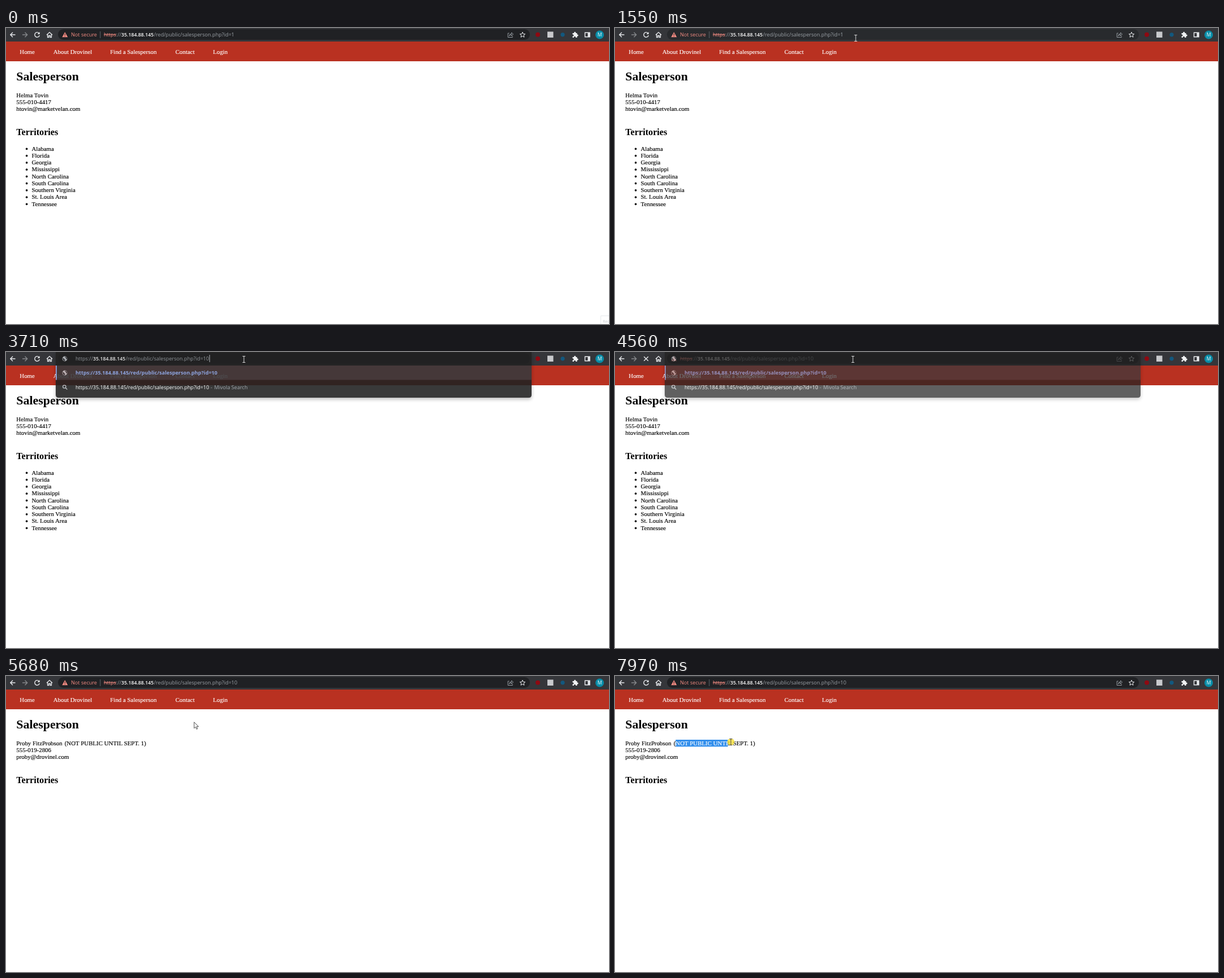
Recreate the animation shown at these times as an HTML page. Size 1067 by 525 pixels, loop 7990 ms.

```html
<!DOCTYPE html>
<html lang="en">
<head>
<meta charset="utf-8">
<title>Salesperson</title>
<style>
  html, body { margin: 0; width: 100%; height: 100%; overflow: hidden; background: #fff; }
  svg { display: block; width: 1067px; height: 525px; }
  text { white-space: pre; }
  .page { font: 10.9px "Liberation Serif", serif; }
  .page text { stroke: #000; stroke-width: .15; }
  .page .light { fill: #fff; stroke: #fff; }
  .page .h1 { font-size: 21.9px; font-weight: bold; stroke: none; }
  .page .h2 { font-size: 16.2px; font-weight: bold; stroke: none; }
  .ui { font: 9.12px "Open Sans", sans-serif; fill: #9aa0a6; }
  .host { font-size: 8.75px; font-weight: 600; fill: #fff; }
  .bad { fill: #f28b82; }
  .struck { text-decoration: line-through; }
  .selected text, .selected .host, .selected .bad { fill: #e8eaed; }
  .line { fill: none; stroke: #e8eaed; stroke-width: 1.4; }
</style>
</head>
<body>
<svg viewBox="0 0 1067 525">
  <defs>
    <clipPath id="labelClip"><rect id="labelWindow" x="114" y="2" width="48" height="20"/></clipPath>
    <clipPath id="markClip"><rect class="mark" x="107.3" y="113" height="12.3"/></clipPath>
    <filter id="shadow" x="-5%" y="-10%" width="110%" height="140%">
      <feDropShadow dx="0" dy="3" stdDeviation="3" flood-opacity=".3"/>
    </filter>
    <g id="globe">
      <circle r="4.4" fill="#bdc1c6"/>
      <path d="M-3.8-1.2Q-1-1.2-.6 1L.8 2.2-.4 4Q-3.6 3-3.8-1.2M.2-4Q.2-2 2-1.6L2.2.4 3.8 1Q4.6-2.8.2-4" fill="#35363a"/>
    </g>
  </defs>

  <g class="page">
    <rect y="24" width="1067" height="35" fill="#b93121"/>
    <g id="nav"></g>
    <text class="h1" x="18.3" y="93">Salesperson</text>
    <text class="h2" x="18.3" y="190.3">Territories</text>
    <g id="firstPage"></g>
    <g id="secondPage">
      <text x="18.3" y="122.7">Proby FitzProbson</text>
      <text id="note" x="103.7" y="122.7">(NOT PUBLIC UNTIL SEPT. 1)</text>
      <text x="18.3" y="135">555-019-2806</text>
      <text x="18.3" y="147.3">proby@drovinel.com</text>
      <rect class="mark" x="107.3" y="113" height="12.3" fill="#338fec"/>
      <text class="light" x="103.7" y="122.7" clip-path="url(#markClip)">(NOT PUBLIC UNTIL SEPT. 1)</text>
    </g>
  </g>

  <g id="notice" class="ui">
    <path d="M1067 510.5h-14.5V525" fill="none" stroke="#e6e9ec"/>
    <text x="1056" y="523" style="font-size:7px;fill:#c4c8cc">Rec</text>
  </g>

  <rect width="1067" height="24" fill="#35363a"/>
  <g class="line">
    <path d="M16.5 12H8M12 7.8L7.8 12 12 16.2"/>
    <path d="M29 12h8.5M33.5 7.8L37.7 12l-4.2 4.2" stroke="#85878a"/>
    <g id="reload"><path d="M58.3 9A4.3 4.3 0 1 0 59.3 13"/><path d="M59.6 7v4h-4z" fill="#e8eaed" stroke="none"/></g>
    <path id="stop" d="M51.2 8.2l7.6 7.6m0-7.6l-7.6 7.6"/>
    <path d="M72 12.2L77 7.6l5 4.6M73.6 11.5V16.5h2.2v-3h2.4v3h2.2V11.5"/>
  </g>

  <rect id="bar" x="92" y="2" width="835" height="19" rx="9.5"/>
  <g id="address" class="ui">
    <path d="M104.3 7.2l5 9h-10z" fill="#f28b82"/>
    <path d="M104.3 10v3m0 .8v1.2" stroke="#202124"/>
    <text class="bad" x="115" y="15.2" clip-path="url(#labelClip)">Not secure</text>
    <path id="divider" d="M166.8 6v12" stroke="#5f6368"/>
    <rect id="urlMark" x="173" y="4" width="232" height="16" fill="#185abc"/>
    <g id="url"></g>
    <path id="urlCaret" d="M405.5 5v13" stroke="#e8eaed"/>
    <g class="line" style="stroke:#9aa0a6;stroke-width:1">
      <path d="M890.5 9.2h-2.3v7.3h8v-2M890.5 14q.3-3.6 4-3.8V8l3 3-3 3v-2q-2.6-.2-4 2z"/>
      <path stroke="#e8eaed" d="M914 7.3l1.3 3.2 3.4.2-2.6 2.2.9 3.4-3-1.9-3 1.9.9-3.4-2.6-2.2 3.4-.2z"/>
    </g>
  </g>
  <rect id="ring" x="92" y="2" width="835" height="19" rx="9.5" fill="none" stroke="#8ab4f8" stroke-width="1.4"/>

  <circle cx="941" cy="11.8" r="4" fill="#8e0912"/>
  <rect x="958" y="6.5" width="10.5" height="10.5" fill="#c9cacd"/>
  <circle cx="985" cy="11.8" r="3.6" fill="#12587f"/>
  <path d="M1002.5 9h2.7a1.6 1.6 0 1 1 3 0h2.3v2.5a1.6 1.6 0 1 1 0 3V17h-2.6a1.5 1.5 0 1 0-2.8 0h-2.6v-2.6a1.5 1.5 0 1 0 0-2.8z" fill="#f1f3f4"/>
  <path d="M1024.5 8.2h8.5v7.6h-8.5z" class="line"/>
  <path d="M1029.5 8h3.5v8h-3.5z" fill="#e8eaed"/>
  <circle cx="1050.5" cy="12" r="7.5" fill="#078da8"/>
  <text class="ui" x="1050.5" y="15" text-anchor="middle" style="font-size:8.5px;fill:#fff">M</text>

  <g id="popup" class="ui">
    <path d="M88 0h842v76q0 5-5 5H93q-5 0-5-5z" fill="#202124" filter="url(#shadow)"/>
    <path d="M88 24h842v25.5H88z" fill="#38393c"/>
    <path d="M88 24h1.8v25.5H88z" fill="#8ab4f8"/>
    <use href="#globe" x="104" y="12"/>
    <use href="#globe" x="104" y="37"/>
    <g class="line" style="stroke:#bdc1c6;stroke-width:1.2"><circle cx="103.3" cy="61.5" r="2.7"/><path d="M105.3 63.5l3 3"/></g>
    <g id="typedUrl"></g>
    <path id="typedCaret" d="M360.3 5v13" stroke="#bdc1c6"/>
    <text x="123" y="40.3" style="font-weight:bold;fill:#8ab4f8">https://35.184.88.145/red/public/salesperson.php?id=10</text>
    <text x="123" y="66.2" style="font-size:9.05px;fill:#fff">https://35.184.88.145/red/public/salesperson.php?id=10</text>
    <text x="362" y="66.2">-</text>
    <text x="368.5" y="66.2">Mivola Search</text>
  </g>

  <g id="cursor">
    <circle id="press" r="6.3" fill="#f7df33" opacity=".8"/>
    <path id="beam" d="M-2.5-5.5h5M0-5.5v11M-2.5 5.5h5" fill="none"/>
    <path id="arrow" d="M0 0v11l2.5-2.4 1.8 4 1.8-.8-1.8-3.8h3.5z" fill="#fff" stroke="#222" stroke-width=".8"/>
  </g>
</svg>
<script>
const LOOP = 7990;
const $ = id => document.getElementById(id);
const show = (id, on) => { $(id).style.display = on ? '' : 'none'; };
const ramp = (t, from, to) => Math.min(1, Math.max(0, (t - from) / (to - from)));
const within = (t, from, to) => t >= from && t < to;
const label = (x, y, words, style = '') => `<text class="${style}" x="${x}" y="${y}">${words}</text>`;

const urlText = (x, id, scheme) => `${scheme}
  <text class="host" x="${x + 31}" y="15.2">35.184.88.145</text>
  <text x="${x + 88.7}" y="15.2">/red/public/salesperson.php?id=<tspan class="pageId">${id}</tspan></text>`;

$('url').innerHTML = urlText(173, 1,
  '<text x="173" y="15.2"><tspan class="bad struck">https</tspan>://</text>');
$('typedUrl').innerHTML = urlText(123, 10, label(123, 15.2, 'https://'));
const pageId = $('url').querySelector('.pageId');

$('nav').innerHTML = [[24.3, 'Home'], [83.7, 'About Drovinel'], [184.3, 'Find a Salesperson'],
  [299.8, 'Contact'], [366.3, 'Login']].map(([x, words]) => label(x, 46, words, 'light')).join('');

const contact = ['Helma Tovin', '555-010-4417', 'htovin@marketvelan.com'];
const territories = ['Alabama', 'Florida', 'Georgia', 'Mississippi', 'North Carolina',
  'South Carolina', 'Southern Virginia', 'St. Louis Area', 'Tennessee'];
$('firstPage').innerHTML =
  contact.map((words, i) => label(18.3, 122.7 + 12.3 * i, words)).join('') +
  territories.map((words, i) => `<circle cx="36.6" cy="${214.4 + 12.25 * i}" r="1.8"/>` +
    label(45.5, 217.7 + 12.25 * i, words)).join('');

// Pointer path: time, x, y
const path = [
  [250, 1046, 514], [500, 942, 414], [800, 620, 180], [1030, 455, 74], [1150, 448, 56],
  [1300, 443, 38], [1420, 435, 27], [1550, 426, 18], [1710, 421, 13],
  [5410, 421, 13], [5600, 375, 50], [5850, 245, 148], [6050, 185, 170], [6190, 163, 161],
  [6350, 128, 122], [6520, 112, 110], [6720, 100, 113], [6990, 111, 120],
  [7410, 111, 120], [7460, 108, 118], [7970, 205, 117]
];

function pointerAt(t) {
  const next = path.findIndex(p => p[0] > t);
  if (next < 0) return path[path.length - 1].slice(1);
  if (next === 0) return path[0].slice(1);
  const a = path[next - 1], b = path[next], k = ramp(t, a[0], b[0]);
  return [a[1] + (b[1] - a[1]) * k, a[2] + (b[2] - a[2]) * k];
}

// Width of the note text selected up to x, snapped to whole letters
function selectedWidth(x) {
  const note = $('note');
  let edge = 107.3;
  for (let i = 1; i < note.getNumberOfChars(); i++) {
    const start = note.getStartPositionOfChar(i).x, end = note.getEndPositionOfChar(i).x;
    if ((start + end) / 2 < x) edge = end;
  }
  return edge - 107.3;
}

function drawAddress(t, hovered) {
  const selected = within(t, 1890, 2840);
  const expand = t < 4540 ? 1 : ramp(t, 4890, 5040);
  const shift = `translate(${-58 * (1 - expand)})`;
  $('bar').setAttribute('fill', hovered && !within(t, 1870, 4640) ? '#282a2d' : '#202124');
  $('ring').style.opacity = t < 3650 ? ramp(t, 1850, 1960) : 0;
  $('url').setAttribute('class', selected ? 'selected' : '');
  $('url').setAttribute('transform', shift);
  $('divider').setAttribute('transform', shift);
  $('divider').style.opacity = expand;
  $('labelWindow').setAttribute('width', 48 * expand);
  pageId.textContent = t < 3650 ? '1' : '10';
  show('urlMark', selected);
  show('urlCaret', within(t, 2840, 3360));
  show('address', !within(t, 3650, 4540));

  const opening = 1 - (1 - ramp(t, 3630, 3750)) ** 2;
  $('popup').style.opacity = opening * (1 - ramp(t, 4530, 4640));
  show('popup', within(t, 3650, 4640));
  show('typedUrl', t < 4540);
  show('typedCaret', t < 4170);
}

function drawPointer(t, x, y, hovered) {
  const pressed = t >= 7410;
  const beam = hovered || t > 6720;
  show('cursor', t >= 250);
  show('press', pressed);
  show('beam', beam);
  show('arrow', !beam);
  $('beam').setAttribute('stroke', hovered ? '#dcdcdc' : '#444');
  $('cursor').setAttribute('transform', `translate(${x} ${y})`);
  const width = pressed ? selectedWidth(x - 3) : 0;
  document.querySelectorAll('.mark').forEach(r => r.setAttribute('width', width));
}

function frame() {
  const t = performance.now() % LOOP;
  const [x, y] = pointerAt(t);
  const hovered = y < 23;
  const loaded = t >= 4930;
  const loading = within(t, 4540, 4930);
  show('notice', t < 30);
  show('firstPage', !loaded);
  show('secondPage', loaded);
  show('stop', loading);
  show('reload', !loading);
  drawAddress(t, hovered);
  drawPointer(t, x, y, hovered);
  requestAnimationFrame(frame);
}
frame();
</script>
</body>
</html>
```
